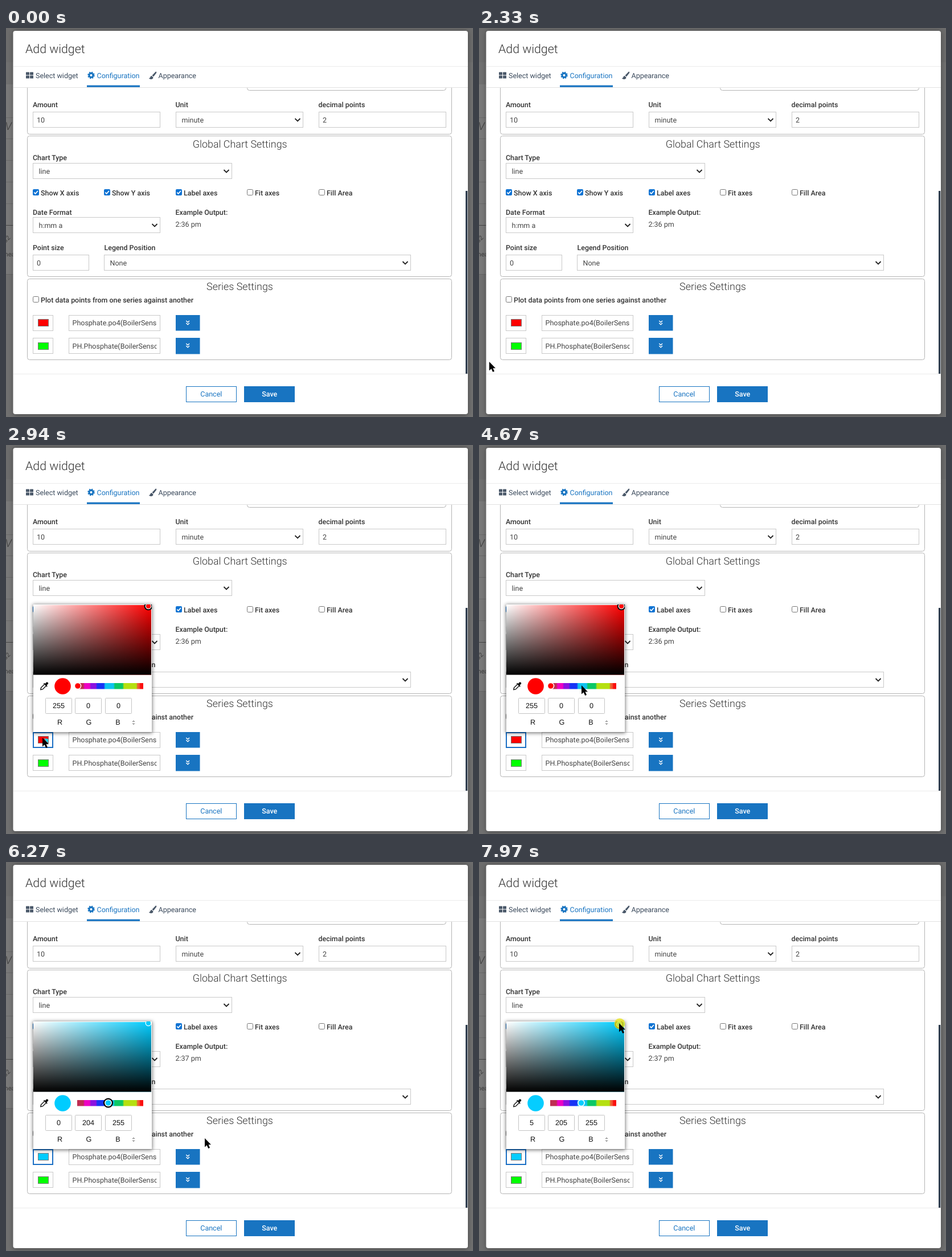
Recreate the animation shown at these times as an HTML page. Size 820 by 683 pixels, loop 8000 ms.

```html
<!DOCTYPE html>
<html lang="en">
<head>
<meta charset="utf-8">
<title>Add widget</title>
<style>
  html, body { margin: 0; width: 100%; height: 100%; overflow: hidden; background: #707070; }
  svg { display: block; width: 820px; height: 683px; --pick: rgb(255,0,0); --hue: rgb(255,0,0); }
  text { font: 400 12.5px Roboto, sans-serif; fill: #444; text-rendering: geometricPrecision; white-space: pre; }
  .label { font-size: 12.43px; font-weight: 500; fill: #333; }
  .head { font-size: 17.9px; font-weight: 300; fill: #333; text-anchor: middle; }
  .title { font-size: 21.3px; font-weight: 300; fill: #333; }
  .tab { fill: #3b4a5c; }
  .mid { text-anchor: middle; }
  .num { font: 400 12.6px "Liberation Sans", Arial, sans-serif; fill: #111; text-anchor: middle; }
  .blue { fill: #1874c1; }
  .group { fill: #fff; stroke: #b4b4b4; }
  .field { fill: #fff; stroke: #c9c9c9; }
  .dim text { fill: #3c3c3c; font-size: 11px; }
</style>
</head>
<body>
<svg id="stage" viewBox="0 0 820 683" xmlns="http://www.w3.org/2000/svg">
  <defs>
    <clipPath id="body"><rect x="13" y="105" width="798" height="502"/></clipPath>
    <clipPath id="panelClip"><rect x="48" y="280" width="208" height="224"/></clipPath>
    <clipPath id="windowClip"><rect x="47" y="279" width="211" height="226"/></clipPath>
    <clipPath id="nameClip"><rect x="111" y="500" width="153.5" height="80"/></clipPath>
    <clipPath id="leftClip"><rect width="13" height="683"/></clipPath>
    <linearGradient id="sat">
      <stop offset="0" stop-color="#fff"/><stop offset="1" style="stop-color:var(--hue)"/>
    </linearGradient>
    <linearGradient id="val" x2="0" y2="1">
      <stop offset="0" stop-color="#000" stop-opacity="0"/><stop offset="1" stop-color="#000"/>
    </linearGradient>
    <linearGradient id="hues"></linearGradient>
    <filter id="soft" x="-10%" y="-10%" width="120%" height="120%"><feGaussianBlur stdDeviation="3"/></filter>
    <filter id="wide" x="-5%" y="-5%" width="110%" height="110%"><feGaussianBlur stdDeviation="4"/></filter>
  </defs>
  <g id="page"></g>
  <g id="ghost" clip-path="url(#windowClip)">
    <rect x="47" y="280" width="211" height="225" fill="none" stroke="#000" stroke-opacity=".3" stroke-width="6" filter="url(#soft)"/>
  </g>
  <g id="picker"></g>
  <circle id="glow" cx="247" cy="284" fill="#e9e51c" fill-opacity=".8"/>
  <path id="wedge" d="M67 515L74 516V523.500L70 520Z" fill="#27d5e6"/>
  <path id="cursor" d="M0 0V15.500L3.600 12.300L6.300 18L9 16.800L6.500 11.300H11Z" fill="#000"/>
</svg>
<script>
const $ = id => document.getElementById(id);
const text = (x, y, s, cls = '', more = '') => `<text x="${x}" y="${y}" class="${cls}" ${more}>${s}</text>`;
const rect = (x, y, w, h, more) => `<rect x="${x}" y="${y}" width="${w}" height="${h}" ${more}/>`;
const line = (d, color, w = 1) => `<path d="${d}" fill="none" stroke="${color}" stroke-width="${w}"/>`;

const group = (y, h) => rect(37.5, y + .5, 745, h, 'rx="4" class="group"');
const field = (x, y, w, s = '', pad = 7) =>
  rect(x + .5, y + .5, w - 1, 27, 'class="field"') + text(x + pad, y + 19, s);
const select = (x, y, w, s) => field(x, y, w, s, 10.5) +
  line(`M${x + w - 14.5} ${y + 12}l4.500 4.500l4.500-4.500`, '#222', 1.8);
const check = (x, y, s, on) =>
  (on ? rect(x, y, 11, 11, 'rx="2" fill="#0f73d3"') + line(`M${x + 2.3} ${y + 5.6}l2.300 2.400l4.300-5`, '#fff', 1.7)
      : rect(x + .5, y + .5, 10, 10, 'rx="2" fill="#fff" stroke="#767676"')) +
  text(x + 14, y + 11, s, 'label');
const expand = (y, h) => rect(298, y, 42.5, h, 'fill="#1874c1"') +
  line(`M316.300 ${y + 10}l2.900 2.700l2.900-2.700m-5.800 4l2.900 2.700l2.900-2.700`, '#fff', 1.4);
const swatch = (y, top, fill) => rect(47.5, y + .5, 35, 27, 'class="field"') +
  rect(56.5, top + .5, 18, 12, `stroke="#777" style="fill:${fill}"`);

function backdrop() {
  const grid = [157, 194, 232, 270, 308].map(y => line(`M0 ${y}.500H13`, '#696969')).join('');
  return rect(0, 0, 820, 683, 'fill="#707070"') + rect(0, 0, 820, 60, 'fill="#6c6c6c"') +
    rect(0, 99, 13, 334, 'fill="#797979"') +
    `<g class="dim" clip-path="url(#leftClip)">${grid}${line('M0 346.500H13', '#444')}` +
    text(-1.5, 179, 'V', '', 'style="font-size:19px;font-weight:300;font-style:italic"') +
    text(-7, 384, '2:32', '', 'transform="rotate(-45 -7 384)"') + text(-6, 401, 'mea') +
    line('M0 432.500H13', '#646464') + '</g>' +
    rect(12, 5, 800, 675, 'rx="5" fill="#000" fill-opacity=".3" filter="url(#wide)"') +
    rect(12.5, 5, 798.5, 673, 'rx="4" fill="#fff"');
}

function header() {
  const tiles = [[35, 78], [42, 78], [35, 84], [42, 84]]
    .map(([x, y]) => rect(x, y - .5, 6, 5, 'rx=".6" fill="#4a5869"')).join('');
  const gear = '<g fill="none" stroke="#1874c1"><circle cx="149.5" cy="83" r="3.500" stroke-width="3"/>' +
    '<circle cx="149.5" cy="83" r="5.200" stroke-width="2.200" stroke-dasharray="2.200 1.884"/></g>';
  const brush = '<path d="M263 76.500q2 .5 1 2.500l-5 6.500l-2.500-2.200zM255.500 84l3 2.600q0 3.600-4 3.400q-2.500 0-3.700-2q2.300.2 2.500-1.800q.5-1.800 2.200-2.200z" fill="#4a5869"/>';
  return text(34, 44, 'Add widget', 'title') + line('M13 67.500H811M13 607.500H811', '#ececec') +
    line('M13 104.500H811', '#e2e2e2') + tiles + gear + brush +
    text(52, 88, 'Select widget', 'tab') + text(159.5, 88, 'Configuration', 'blue') +
    text(267.5, 88, 'Appearance', 'tab') + rect(142, 100.6, 93, 3.2, 'fill="#1874c1"');
}

function form() {
  return '<g clip-path="url(#body)">' +
    group(60, 126) + rect(423.5, 80.5, 349, 29, 'rx="4" class="group"') +
    text(47, 139, 'Amount', 'label') + field(47, 147, 224, '10') +
    text(297.5, 139, 'Unit', 'label') + select(298, 147, 224, 'minute') +
    text(548.5, 139, 'decimal points', 'label') + field(549, 147, 224, '2') +
    group(189, 247) + text(410.7, 209.5, 'Global Chart Settings', 'head') +
    text(47, 232, 'Chart Type', 'label') + select(47, 237, 350, 'line') +
    ['Show X axis', 'Show Y axis', 'Label axes', 'Fit axes', 'Fill Area']
      .map((s, i) => check(47 + Math.floor(i * 125.5), 283, s, i < 3)).join('') +
    text(47, 327.5, 'Date Format', 'label') + select(47, 332, 224, 'h:mm a') +
    text(297.5, 327.5, 'Example Output:', 'label') + text(297.5, 349, '', '', 'id="clock"') +
    text(47, 389.5, 'Point size', 'label') + field(47, 398, 99, '0') +
    text(172.5, 389.5, 'Legend Position', 'label') + select(172, 398, 539, 'None') +
    group(440, 142) + text(410.5, 460, 'Series Settings', 'head') +
    check(47, 471, 'Plot data points from one series against another') +
    swatch(504, 511, 'var(--pick)') + swatch(544, 552, '#0f0') +
    rect(48, 505, 34, 26, 'id="focus" fill="none" stroke="#1b6fc4" stroke-width="2"') +
    field(110, 504, 161) + field(110, 544, 161) + '<g clip-path="url(#nameClip)">' +
    text(116.5, 522, 'Phosphate.po4(BoilerSensor)') + text(116.5, 563, 'PH.Phosphate(BoilerSensor)') + '</g>' +
    expand(504, 27.5) + expand(544, 28.5) + '</g>' + rect(807, 286, 3.3, 321, 'fill="#2e3c4d"') +
    rect(316.5, 629.5, 88, 27, 'fill="#fff" stroke="#1874c1"') + text(360.3, 647, 'Cancel', 'mid blue') +
    rect(418, 629, 89, 28, 'fill="#1874c1"') + text(462.7, 647, 'Save', 'mid', 'style="fill:#fff;font-weight:500"');
}

function picker() {
  const box = (x, id) => rect(x + .5, 444.5, 46, 27, 'rx="1" fill="#fff" stroke="#c4c4c4"') +
    text(x + 23.5, 462, '', 'num', `id="${id}"`);
  const ring = (id, focus) => `<g id="${id}"><circle id="${id}Focus" r="${focus}" fill="#000"/>` +
    '<circle r="6.300" fill="#fff"/><circle r="4.800" style="fill:var(--pick)"/></g>';
  const dropper = '<g transform="translate(66.500 424) rotate(45)">' +
    '<path d="M-2-9q2-2 4 0v4h2v2h-8v-2h2z" fill="#111"/><path d="M-2-3v8l2 3l2-3v-8" fill="#fff" stroke="#111" stroke-width="1.400"/></g>';
  return rect(47, 280, 210, 226, 'fill="#000" fill-opacity=".5" filter="url(#soft)"') +
    rect(48, 280, 208, 224, 'fill="#fff"') + '<g clip-path="url(#panelClip)">' +
    rect(48, 281, 207, 122.5, 'fill="url(#sat)"') + rect(48, 281, 207, 122.5, 'fill="url(#val)"') +
    ring('tone', 8.6) + '</g>' + dropper +
    '<circle cx="99.5" cy="423.5" r="14.300" style="fill:var(--pick)"/>' +
    rect(125, 418, 116, 10.5, 'fill="url(#hues)"') + ring('hue', 8.6) +
    box(69, 'r') + box(121, 'g') + box(174, 'b') +
    text(94.5, 491, 'R', 'num') + text(145.5, 491, 'G', 'num') + text(196.5, 491, 'B', 'num') +
    line('M222.300 486l1.700-1.700l1.700 1.700m-3.400 2.700l1.700 1.700l1.700-1.700', '#222', 1);
}

// Banded hue strip: colour and its right edge
const bands = [['#bf2d52', 12], ['#ee00c4', 23], ['#8a12e0', 34], ['#1733f5', 48], ['#0fc3f0', 65],
  ['#0cc865', 81], ['#b5e010', 105], ['#f05a32', 110], ['#fb0d0d', 116]];
let edge = 0;
$('hues').innerHTML = bands.map(([c, end]) => {
  const stops = [edge + 1.5, end - 1.5].map(p => `<stop offset="${p / 116}" stop-color="${c}"/>`).join('');
  edge = end;
  return stops;
}).join('');
$('page').innerHTML = backdrop() + header() + form();
$('picker').innerHTML = picker();

// Pointer steps: time, x, y
const moves = [[0, -50, -50], [490, 765, 668], [600, 800, 672], [970, 798, 630], [1090, 775, 580], [1220, 761, 546],
  [1590, 723, 524], [1730, 690, 494], [1850, 600, 462], [1970, 460, 458], [2090, 290, 495], [2210, 110, 533],
  [2330, 18, 586], [2450, 58, 513], [2580, 64, 514], [3680, 90, 497], [3800, 160, 448], [3920, 216, 421],
  [4040, 174, 422], [4410, 177, 422], [4530, 181, 422], [4670, 180, 422], [6270, 349, 485], [6390, 335, 440],
  [6510, 310, 375], [6630, 285, 325], [6750, 262, 294], [6870, 246, 279], [6990, 237, 275], [7110, 240, 278],
  [7230, 244, 281], [7360, 246, 283]];
const colors = [[0, 255, 0, 0], [4910, 0, 204, 255], [7730, 5, 205, 255]];
const glows = [[0, 0], [7730, 12], [7850, 11], [7970, 9.5]];
const at = (steps, t) => steps.filter(s => s[0] <= t).pop().slice(1);
const show = (id, on) => { $(id).style.display = on ? '' : 'none'; };
const place = (id, x, y, k = 1) => $(id).setAttribute('transform', `translate(${x} ${y}) scale(${k})`);

function draw(t) {
  const rgb = at(colors, t), hued = t >= 4910, toned = t >= 7730;
  const style = $('stage').style;
  style.setProperty('--pick', `rgb(${rgb})`);
  style.setProperty('--hue', hued ? 'rgb(0,204,255)' : 'rgb(255,0,0)');
  ['r', 'g', 'b'].forEach((id, i) => { $(id).textContent = rgb[i]; });
  $('clock').textContent = t < 5030 ? '2:36 pm' : '2:37 pm';

  show('focus', t >= 2700);
  show('ghost', t >= 2820 && t < 2940);
  show('picker', t >= 2940);
  show('wedge', t >= 2580 && t < 3680);

  place('tone', toned ? 246 : 250, toned ? 285 : 283, .85);
  place('hue', hued ? 179.5 : 126, 423);
  show('toneFocus', !hued || toned);
  show('hueFocus', hued && !toned);
  $('glow').setAttribute('r', at(glows, t)[0]);
  place('cursor', ...at(moves, t));
}

const start = performance.now();
function tick() {
  draw((performance.now() - start) % 8000);
  requestAnimationFrame(tick);
}
tick();
</script>
</body>
</html>
```
